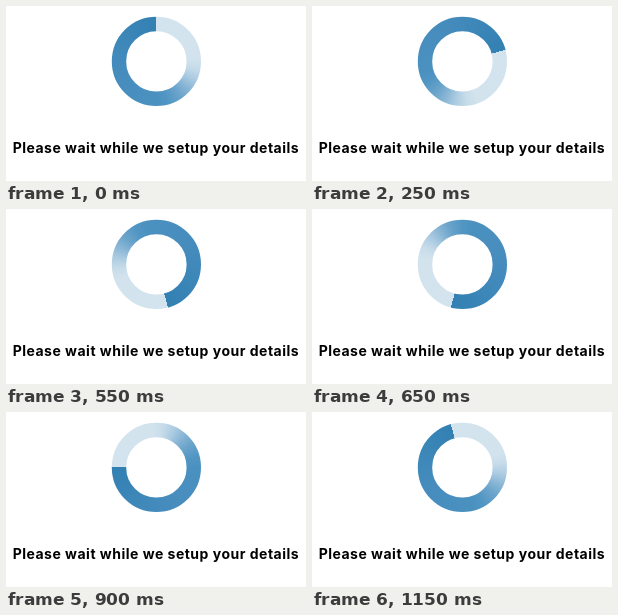
These frames come from a looping animation (300 px wide and 175 px high, 1.2 s). An HTML page with a canvas:

```html
<!DOCTYPE html>
<html lang="en">
<head>
<meta charset="utf-8">
<title>Please wait</title>
<style>
  html, body { margin: 0; width: 100%; height: 100%; overflow: hidden; background: #fff; }
  canvas, svg { position: absolute; left: 0; top: 0; display: block; }
  text { font: 700 14px Inter, "Open Sans", sans-serif; letter-spacing: 0.5px; fill: #000; text-anchor: middle; }
</style>
</head>
<body>
<canvas id="ring" width="300" height="175"></canvas>
<svg width="300" height="175" viewBox="0 0 300 175">
  <text x="149.9" y="147">Please wait while we setup your details</text>
</svg>
<script>
  const LOOP = 1200, STEP = 50;
  const CX = 150.4, CY = 55.4, OUTER = 44.6, INNER = 30.2;
  // Clockwise colour stops in degrees, measured from the dark edge
  const STOPS = [
    [0, '#d4e4ef'], [84, '#d2e3ee'], [100, '#c6dbe9'], [115, '#abcbe1'],
    [130, '#89b6d5'], [145, '#6ba4cb'], [165, '#5196c3'], [180, '#4b91c0'],
    [260, '#458cbd'], [360, '#3380b3']
  ];
  const ctx = document.getElementById('ring').getContext('2d');

  function draw(time) {
    const step = Math.floor((time % LOOP) / STEP);
    const turn = step * STEP / LOOP * 2 * Math.PI;
    const paint = ctx.createConicGradient(turn - Math.PI / 2, CX, CY);
    for (const [deg, color] of STOPS) paint.addColorStop(deg / 360, color);
    ctx.clearRect(0, 0, 300, 175);
    ctx.beginPath();
    ctx.arc(CX, CY, (OUTER + INNER) / 2, 0, 2 * Math.PI);
    ctx.lineWidth = OUTER - INNER;
    ctx.strokeStyle = paint;
    ctx.stroke();
  }

  const start = performance.now();
  function tick() {
    draw(performance.now() - start);
    requestAnimationFrame(tick);
  }
  tick();
</script>
</body>
</html>
```
